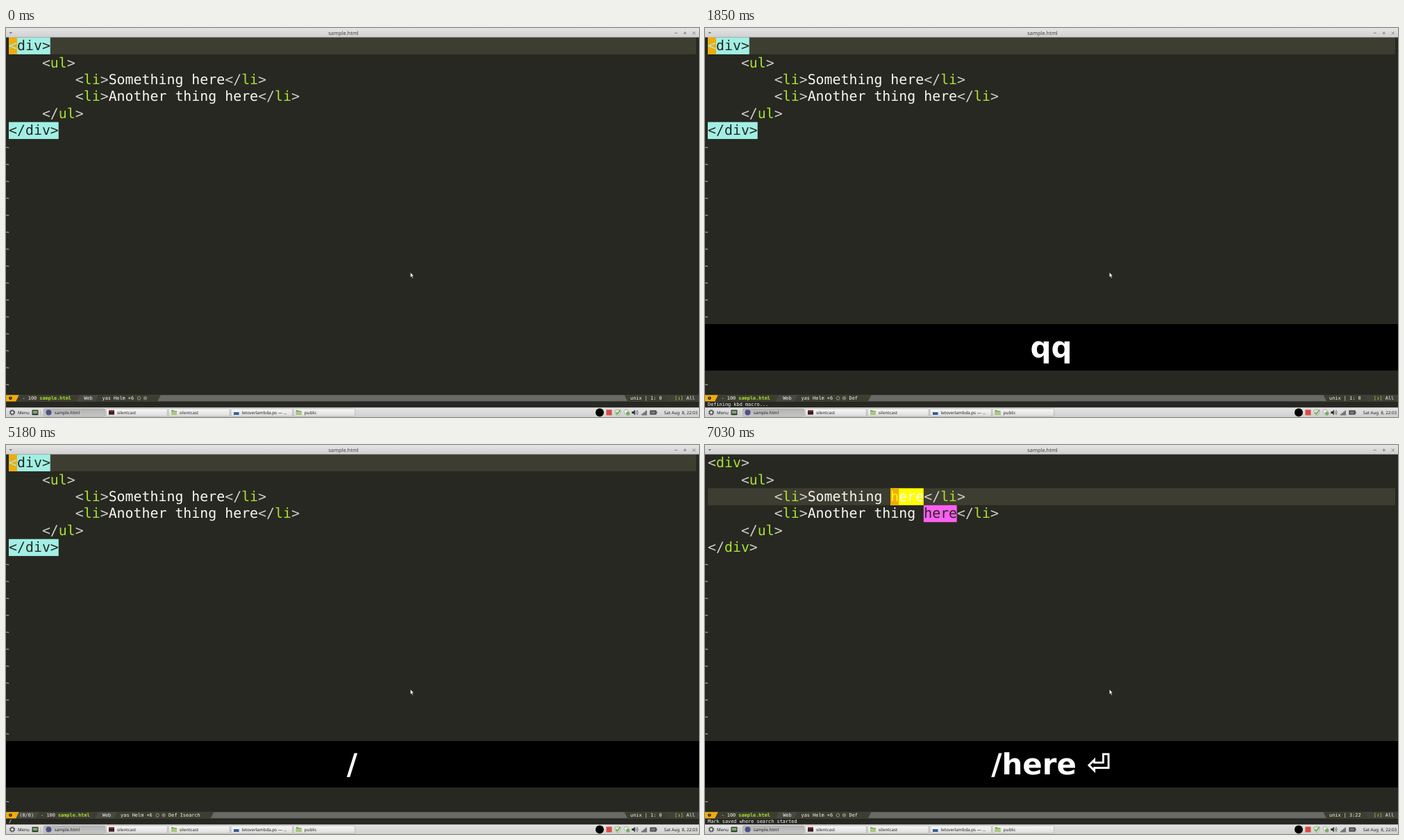
These frames come from a looping animation (998 by 561 pixels, 8000 ms). An HTML page:

```html
<!DOCTYPE html>
<html lang="en">
<head>
<meta charset="utf-8">
<title>Editor macro recording</title>
<style>
  html, body { margin: 0; width: 100%; height: 100%; overflow: hidden; background: #272822; }
  svg { display: block; width: 100vw; height: 100vh; }
  text { white-space: pre; text-rendering: geometricPrecision; }
  .code { font: 19.86px "DejaVu Sans Mono", monospace; }
  .small { font: 6.907px "DejaVu Sans Mono", monospace; fill: #f8f8f2; }
  .panel { font: 6.2px "Noto Sans", sans-serif; fill: #222; }
  .keys { font: bold 42px "DejaVu Sans", sans-serif; fill: #fff; text-anchor: middle; }
</style>
</head>
<body>
<svg id="stage" viewBox="0 0 998 561" preserveAspectRatio="none">
  <defs>
    <linearGradient id="bar" x2="0" y2="1"><stop stop-color="#e4e4e4"/><stop offset="1" stop-color="#d0d0d0"/></linearGradient>
    <linearGradient id="button" x2="0" y2="1"><stop stop-color="#f8f8f8"/><stop offset="1" stop-color="#dcdcdc"/></linearGradient>
    <linearGradient id="pressed" x2="0" y2="1"><stop stop-color="#b2b2b2"/><stop offset="1" stop-color="#c6c6c6"/></linearGradient>
  </defs>
  <g id="editor"></g>
  <g id="desktop"></g>
</svg>
<script>
const LOOP = 8000;
const COL = 11.955, ROW = 24.43, LEFT = 4, TOP = 13.5, SMALL = 4.158;
const GREEN = '#a6e22e', WHITE = '#f8f8f2', DARK = '#272822', ORANGE = '#efac0c';
const LINE = '#3e3d31', AQUA = '#a1efe4', YELLOW = '#ffff00', PINK = '#fd5ff0';

const source = [
  '<div>',
  '    <ul>',
  '        <li>Something here</li>',
  '        <li>Another thing here</li>',
  '    </ul>',
  '</div>'
];

// A mark is [row, first column, last column + 1, background, text colour].
const pair = [[0, 0, 5, AQUA, DARK], [5, 0, 6, AQUA, DARK], [0, 0, 1, ORANGE, AQUA]];
const found = (length, cursor, cursorText, foreign = []) => [
  [2, 22, 22 + length, YELLOW, WHITE],
  ...foreign,
  [3, 26, 26 + length, PINK, DARK],
  [2, cursor, cursor + 1, ORANGE, cursorText]
];

const start = { at: 0, line: 0, marks: pair, keys: '', count: '', modes: '', echo: '', pos: '1: 0' };
const recording = { ...start, modes: 'Def', echo: 'Defining kbd macro...' };
const searching = { ...start, modes: 'Def Isearch', line: 2 };
const states = [
  start,
  { ...start, at: 1480, line: -1, keys: 'q' },
  { ...recording, at: 1850, keys: 'qq' },
  { ...recording, at: 4440 },
  { ...searching, at: 5180, line: 0, keys: '/', echo: '/', count: '(0/0)' },
  { ...searching, at: 5550, keys: '/her', echo: '/her', count: '(1/3)', pos: '3:25',
    marks: found(3, 25, LINE, [[3, 16, 19, PINK, DARK]]) },
  { ...searching, at: 5920, keys: '/here', echo: '/here', count: '(1/2)', pos: '3:26',
    marks: found(4, 26, LINE) },
  { ...recording, at: 7030, line: 2, keys: '/here ⏎', echo: 'Mark saved where search started',
    pos: '3:22', marks: found(4, 22, YELLOW) }
];

const escape = s => s.replace(/&/g, '&amp;').replace(/</g, '&lt;').replace(/>/g, '&gt;');
const rect = (x, y, w, h, fill, extra = '') =>
  `<rect x="${x}" y="${y}" width="${w}" height="${h}" fill="${fill}" ${extra}/>`;
const path = (d, fill, stroke = 'none', width = 1) =>
  `<path d="${d}" fill="${fill}" stroke="${stroke}" stroke-width="${width}"/>`;
const circle = (x, y, r, fill, stroke = 'none', width = .6) =>
  `<circle cx="${x}" cy="${y}" r="${r}" fill="${fill}" stroke="${stroke}" stroke-width="${width}"/>`;
const text = (x, y, kind, s, extra = '') =>
  `<text x="${x}" y="${y}" class="${kind}" ${extra}>${escape(s)}</text>`;

function syntaxColours(line) {
  const colours = Array(line.length).fill(WHITE);
  for (const tag of line.matchAll(/<\/?\w+>/g))
    [...tag[0]].forEach((c, i) => colours[tag.index + i] = /\w/.test(c) ? GREEN : '#cfcfc8');
  return colours;
}

function drawCode({ line, marks }) {
  let out = line < 0 ? '' : rect(LEFT, TOP + line * ROW, 990, ROW, LINE);
  const colours = source.map(syntaxColours);
  for (const [row, from, to, back, fore] of marks) {
    out += rect(LEFT + from * COL, TOP + row * ROW, (to - from) * COL, ROW, back);
    colours[row].fill(fore, from, to);
  }
  source.forEach((s, row) => {
    const spans = [...s].map((c, i) => `<tspan fill="${colours[row][i]}">${escape(c)}</tspan>`);
    out += `<text x="${LEFT}" y="${TOP + row * ROW + 18.7}" class="code">${spans.join('')}</text>`;
  });
  for (let row = 6; row < 21; row++) {
    const y = TOP + (row + .5) * ROW;
    out += path(`M.2 ${y + .5}q1-1.6 2 -.4t2-.5`, 'none', WHITE, .8);
  }
  return out;
}

const segment = (end, fill) => path(`M0 529.3H${end + 2.3}L${end - 2.3} 538.4H0z`, fill);

function drawStatus({ count, modes, pos }) {
  const shift = count ? 26.6 : 0, minor = 138.5 + shift;
  const end = minor + 82 + (modes ? (modes.length + 1) * SMALL : 0);
  const y = 536.1;
  return rect(0, 529.3, 998, 9.1, '#696966')
    + segment(end, LINE) + segment(131 + shift, '#494943') + segment(104 + shift, LINE)
    + (count ? segment(45, '#494943') + text(19.3, y, 'small', count) : '')
    + segment(16.5, ORANGE)
    + circle(6.4, 533.8, 2.4, DARK) + text(5.1, 535.4, 'small', '1', `style="font-size:4.4px;fill:${ORANGE}"`)
    + text(23.5 + shift, y, 'small', '- 100')
    + text(48.3 + shift, y, 'small', 'sample.html', `style="font-weight:bold;fill:${GREEN}"`)
    + text(112.2 + shift, y, 'small', 'Web')
    + text(minor, y, 'small', 'yas Helm +6')
    + path(`M${minor + 50.6} 533.9l1.2-2.2h2.4l1.2 2.2-1.2 2.2h-2.4z`, 'none', '#d0d0c8', .6)
    + circle(minor + 62, 533.9, 2.2, 'none', '#d0d0c8') + circle(minor + 62, 533.7, .8, 'none', '#d0d0c8')
    + text(minor + 69, y, 'small', modes)
    + path('M890.5 529.3H998V538.4H895z', LINE) + path('M950 529.3H998V538.4H954.5z', '#41413a')
    + text(899, y, 'small', 'unix | ' + pos)
    + text(963, y, 'small', '[↕]', `style="fill:${GREEN}"`) + text(979.8, y, 'small', 'All');
}

function drawEditor(state) {
  return rect(0, 0, 998, 561, DARK) + drawCode(state) + drawStatus(state)
    + text(LEFT, 545.4, 'small', state.echo)
    + (state.keys ? rect(0, 427, 998, 67, '#000') + text(498.5, 475, 'keys', state.keys) : '');
}

function drawTask(x, width, label, active, icon) {
  return rect(x, 549, width, 11.2, `url(#${active ? 'pressed' : 'button'})`, 'rx="1.5" stroke="#a5a5a5" stroke-width=".6"')
    + icon + text(x + 15.6, 557, 'panel', label);
}

const folder = x => path(`M${x} 551h3l1 1h4v6h-8z`, '#86a860') + rect(x, 553.2, 8, 4.6, '#a9ca83');

function drawDesktop() {
  const grey = '#777';
  const title = rect(0, 0, 998, 13.5, 'url(#bar)')
    + text(486, 10, 'panel', 'sample.html', 'style="font-size:7.45px;fill:#444" text-anchor="middle"')
    + path('M4.5 6h4.6l-2.3 2.6z', grey)
    + path('M962.8 7.3h4M975.6 7.3h4.2M977.7 5.2v4.2M988.8 5.4l4 4M992.8 5.4l-4 4', 'none', grey, .9);

  const tasks = rect(0, 547.3, 998, 13.7, 'url(#bar)')
    + circle(9, 554.4, 2.6, 'none', '#444', 1.2)
    + `<circle cx="9" cy="554.4" r="3.8" fill="none" stroke="#444" stroke-width="1" stroke-dasharray="1.5"/>`
    + text(17, 557, 'panel', 'Menu')
    + rect(37.5, 550.8, 9, 7.4, '#333', 'rx=".8"') + rect(38.7, 552, 6.6, 4.2, '#74ad68')
    + path('M49.8 551v8', 'none', '#aaa', .6)
    + drawTask(54.2, 88.5, 'sample.html', true, circle(61.5, 554.4, 4, '#4b5087'))
    + drawTask(144.3, 88, 'silentcast', false, rect(148, 551.2, 8, 6.4, '#322') + rect(148, 551.2, 8, 1.8, '#a33'))
    + drawTask(234.2, 88, 'silentcast', false, folder(238))
    + drawTask(324, 88.5, 'letoverlambda.ps — ...', false, rect(329, 550.5, 6, 8, '#f5f5f5') + rect(328, 554, 7.5, 4, '#315e9d'))
    + drawTask(414.2, 88.5, 'public', false, folder(417.5));

  const tray = circle(855, 554.5, 6, '#000') + rect(864.5, 550.5, 8, 8, '#d94b43')
    + path('M881 550l4.3 1.3c0 4-1.5 6.2-4.3 8-2.8-1.8-4.3-4-4.3-8z', '#d5e6c6', '#8a9b7b', .6)
    + path('M878.5 554.5l2 2.3 4-5.8', 'none', '#51973b', 1.3)
    + circle(893, 553.2, 3, '#eee', '#888') + circle(895.7, 556, 2.7, '#72b35a')
    + path('M901.3 553h2l2.5-2.5v8l-2.5-2.5h-2z', '#333')
    + path('M907 552.5q1.5 2 0 4M908.7 551q2.8 3.5 0 7', 'none', '#444', .8)
    + [0, 1, 2, 3].map(i => rect(915.3 + i * 2, 556.5 - i * 1.6, 1.5, 2 + i * 1.6, '#555')).join('')
    + rect(928, 552, 8, 5, '#777', 'stroke="#222" stroke-width="1"') + rect(936.5, 553.4, 1, 2.2, '#222')
    + text(996, 557, 'panel', 'Sat Aug  8, 22:03', 'text-anchor="end"');

  const pointer = path('M582.3 352.3v7.4l1.7-1.5 1.2 2.8 1.2-.5-1.2-2.8h2.2z', '#fff', '#111', .5);
  return title + tasks + tray + pointer;
}

const editor = document.getElementById('editor');
document.getElementById('desktop').innerHTML = drawDesktop();

const began = performance.now();
let shown = null;
function tick() {
  const time = (performance.now() - began) % LOOP;
  const state = states.findLast(s => s.at <= time);
  if (state !== shown) editor.innerHTML = drawEditor(shown = state);
  requestAnimationFrame(tick);
}
tick();
</script>
</body>
</html>
```
